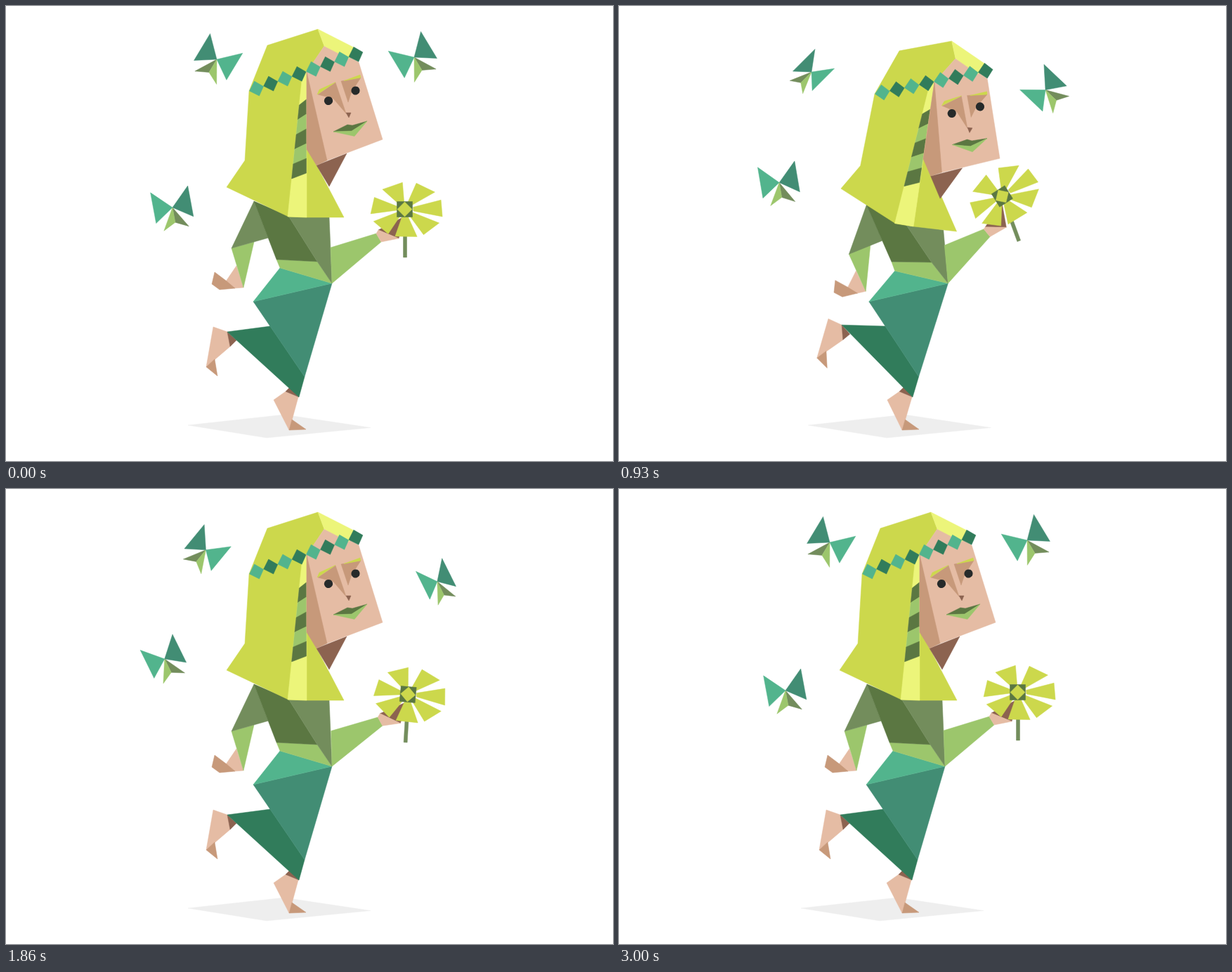
Animation, 864 px wide and 648 px high, one loop 3600 ms. Source, as an HTML page with a canvas:

```html
<!DOCTYPE html>
<html lang="en">
<head>
<meta charset="utf-8">
<title>Runner with flower</title>
<style>
html, body { margin: 0; width: 100%; height: 100%; overflow: hidden; background: #fff; }
canvas { display: block; }
</style>
</head>
<body>
<canvas id="stage" width="864" height="648"></canvas>
<script>
const ctx = document.getElementById('stage').getContext('2d');
const LOOP = 3600, FLIGHT = 3000, STEP = 30;
const { PI, sin, cos, floor } = Math;
const DEG = PI / 180;

const C = {
  hair: '#ccd84c', shine: '#ecf57a', skin: '#e5bca4', tan: '#c7997a', brown: '#8c6350',
  moss: '#5b7742', olive: '#738d5c', leaf: '#9cc66c',
  mint: '#52b48d', teal: '#428d74', pine: '#317c5b', eye: '#262a2a', shadow: '#eeeeee'
};

// ---- timing ----
const cubic = u => u < .5 ? 4 * u ** 3 : 1 - 4 * (1 - u) ** 3;
const smooth = u => u * u * (3 - 2 * u);

// keys: [time, value] pairs with eased travel between them
function eased(t, keys, ease) {
  for (let i = 1; i < keys.length; i++) {
    const [t0, a] = keys[i - 1], [t1, b] = keys[i];
    if (t < t1) return a + (b - a) * ease((t - t0) / (t1 - t0));
  }
  return keys[keys.length - 1][1];
}

// ---- geometry ----
const still = (x, y) => [x, y];

// point map: turns by deg about (px, py), then shifts by (dx, dy)
function turn(px, py, dx, dy, deg) {
  const c = cos(deg * DEG), s = sin(deg * DEG);
  return (x, y) => [
    px + dx + (x - px) * c - (y - py) * s,
    py + dy + (x - px) * s + (y - py) * c
  ];
}

// joint factory: rest place plus k times its reach
const joints = k => (x, y, dx, dy) => [x + k * dx, y + k * dy];

function fill(color, points) {
  ctx.beginPath();
  for (const [x, y] of points) ctx.lineTo(x, y);
  ctx.closePath();
  ctx.fillStyle = ctx.strokeStyle = color;
  ctx.fill();
  ctx.stroke();
}

// flat x, y list drawn through a point map
function shape(color, map, ...xy) {
  const points = [];
  for (let i = 0; i < xy.length; i += 2) points.push(map(xy[i], xy[i + 1]));
  fill(color, points);
}

// ---- figure ----
function legs(p, hip, seat) {
  shape(C.skin, still, 381, 561, 398, 549, 416, 557, 407, 590, 403, 604);
  shape(C.brown, still, 404, 543, 417, 557, 398, 549);
  shape(C.tan, still, 403, 604, 407, 589, 427, 603);

  const foot = turn(315, 464, -p, -9.3 * p, 4.8 * p);
  shape(C.skin, foot, 295, 457, 315, 464, 319, 485, 285, 514);
  shape(C.brown, foot, 315, 464, 328, 476, 319, 485);
  shape(C.tan, foot, 285, 514, 297, 503, 301, 527);

  const knee = foot(315, 464), belly = [352, 421], hem = [425, 528];
  fill(C.pine, [knee, [376, 456], hem, [417, 557]]);
  fill(C.teal, [belly, hip, hem]);
  fill(C.mint, [seat, hip, belly]);
}

function torso(p, hip, seat) {
  const at = joints(p);
  const shoulder = at(353, 278, -7, 5), back = at(385, 361, -2, 3), waist = at(443, 364, -3, 1);
  const chest = at(402, 299, 0, 11), bust = at(460, 300, -4, 18), elbow = at(321, 345, 1, 8);
  const armpit = shoulder.map((v, i) => v + .63 * (back[i] - v));

  const forearm = turn(321, 345, p, 8 * p, -8 * p);
  shape(C.skin, forearm, 328, 370, 338, 401, 325, 402, 313, 392);
  shape(C.tan, forearm, 297, 379, 313, 391, 326, 402, 304, 404, 293, 396);
  shape(C.leaf, forearm, 321, 345, 353, 336, 338, 401);
  fill(C.olive, [shoulder, armpit, elbow]);
  fill(C.leaf, [back, waist, hip, seat]);
  fill(C.moss, [shoulder, chest, waist, back]);
  fill(C.olive, [chest, bust, hip, waist]);
}

function armWithFlower(q, hip) {
  const at = joints(q);
  const wrist = at(527, 324, -13, -6), cuff = at(534, 336, -11, -7);
  const knuckle = at(530, 319, -14, -4), palm = at(559, 331, -13, -15);
  const [x, y] = at(567.5, 289.5, -27.5, -17.5);

  shape(C.olive, turn(0, 0, x, y, -20 * q), -2, 20, 3, 20, 3, 68.5, -2, 68.5);
  fill(C.leaf, [at(462, 344, -4, -3), wrist, cuff, hip]);
  fill(C.brown, [knuckle, [x, y + 10], palm]);
  fill(C.skin, [wrist, knuckle, palm, cuff]);

  const spin = turn(0, 0, x, y, -31 * q);
  // seven petals on a squashed ring, crowded a little to one side
  const ring = (a, r) => spin(.06 * r + r * sin(a), .02 * r - .76 * r * cos(a));
  for (let i = 0; i < 7; i++) {
    const even = i * 2 * PI / 7 - 23 * DEG;
    const a = even + 6.5 * DEG * sin(even + 10 * DEG), w = 17.5 * DEG;
    fill(C.hair, [ring(a - w, 52), ring(a + w, 52), ring(a + w, 12), ring(a - w, 12)]);
  }
  shape(C.moss, spin, -11, -11, 11, -11, 11, 11, -11, 11);
  shape(C.hair, spin, 0, -10.5, 10.5, 0, 0, 10.5, -10.5, 0);
}

function hair(p, head) {
  const at = joints(p);
  const crown = head(444, 33), fringe = head(428, 94), parting = head(428, 301);
  fill(C.hair, [
    head(372, 56), crown, head(453, 57), fringe, parting, head(402, 300),
    at(314, 258, -5, 2), at(340, 220, -4, 7), head(346, 121)
  ]);
  fill(C.hair, [head(428, 200), at(481, 301, -6, 19), parting]);
  shape(C.brown, head, 442, 227, 485, 210, 460, 257);

  const edge = y => 422 - (y - 96) * .103;
  shape(C.shine, head, edge(96), 96, 428, 92, 428, 301, edge(300), 300);
  for (let i = 0; i < 5; i++) {
    const l = 141 + 21 * i, r = l - 8;
    shape(i % 2 ? C.leaf : C.moss, head, edge(l), l, 427.5, r, 427.5, r + 21, edge(l + 21), l + 21);
  }
}

function face(head, tilt, shut) {
  shape(C.skin, head, 453, 57, 488, 72, 502, 80, 536, 190, 457, 220, 428, 204, 428, 94);
  shape(C.tan, head, 428, 94, 457, 220, 442, 227, 428, 204);
  shape(C.shine, head, 444, 33, 497, 60, 488, 75, 453, 57);

  shape(C.tan, head, 444, 126, 469, 109, 484, 153, 466, 132);
  shape(C.tan, head, 477, 107, 505, 102, 492, 122, 487, 137);
  shape(C.hair, head, 443, 126, 446, 119, 469, 108.5);
  shape(C.hair, head, 481, 106.5, 504, 98, 505, 102);
  shape(C.brown, head, 484, 152, 491, 152, 488, 159);
  shape(C.moss, head, 466, 179, 486, 169, 493, 170, 514, 164, 492, 178);
  shape(C.leaf, head, 466, 179, 492, 178, 514, 164, 496, 185.5);

  ctx.fillStyle = C.eye;
  for (const [x, y] of [head(459, 135), head(497.5, 120.5)]) {
    ctx.save();
    ctx.translate(x, y);
    ctx.rotate((tilt - 17) * DEG);
    ctx.beginPath();
    if (shut) ctx.rect(-8, 2.8, 16, 4.4);
    else ctx.arc(0, 0, 6.1, 0, 2 * PI);
    ctx.fill();
    ctx.restore();
  }

  for (let i = 0; i < 8; i++) {
    const x = 356.5 + 20.2 * i, y = 117.5 - 6.95 * i;
    shape(i % 2 ? C.pine : C.mint, head, x - 3, y - 10.5, x + 10, y - 3, x + 4, y + 10.5, x - 10, y + 3.5);
  }
}

// ---- butterflies ----
// side 1 has the dark wing on the right; beats is the number of flaps per flight
function butterfly(side, x, y, tilt, t, beats) {
  const open = .85 + .15 * cos(2 * PI * beats * t / FLIGHT);
  const map = turn(0, 0, x, y, tilt);
  for (const [dir, upper, lower] of [[side, C.teal, C.olive], [-side, C.mint, C.leaf]]) {
    const w = dir * open;
    shape(lower, map, 0, 0, 18 * w, 30.5, 0, 21.5);
    shape(upper, map, 0, 0, 27 * w, -26.5, 27 * w, 18);
  }
}

function butterflies(t) {
  const phase = PI * t / FLIGHT;
  const drift = sin(phase) ** 2, swing = sin(2 * phase);
  const dash = eased(t, [[0, 0], [860, 1], [1100, 1], [2850, 0]], smooth);
  butterfly(-1, 300 - 26 * dash, 76 + 18 * dash, 31 + 14 * dash, t, 11);
  butterfly(1, 581 + 38 * drift, 73 + 68 * drift, -31 - 13 * swing - 5 * drift, t, 7);
  butterfly(1, 237 - 13 * drift, 287 - 52 * drift, -10.5 + 9 * swing - 11 * drift, t, 3);
}

function draw(t) {
  const bow = eased(t, [[0, 0], [820, 1.06], [870, 1.06], [1700, 0]], cubic);
  const reach = eased(t, [[0, 0], [820, 1.06], [870, 1.06], [1700, -.18], [2400, 0]], cubic);
  const sway = eased(t, [[0, 0], [360, -3.6], [930, 4.4], [1680, 0]], smooth);
  const shut = t >= 570 && t < 750;

  ctx.fillStyle = '#fff';
  ctx.fillRect(0, 0, 864, 648);
  ctx.lineWidth = .5;
  ctx.lineJoin = 'round';

  const ground = turn(0, 0, 1.7 * sway + 2.7 * bow, 0, 0);
  shape(C.shadow, ground, 259, 597, 396, 582, 519, 600.5, 371, 615);

  const hip = [464, 395], seat = joints(bow)(390, 373, -2, 4);
  const tilt = 6.7 * bow;
  const head = turn(444, 33, 17 * bow, 16 * bow, tilt);

  // the whole figure leans about the planted toe
  ctx.save();
  ctx.transform(1, 0, -sway / 210, 1, sway * 604 / 210, 0);
  legs(bow, hip, seat);
  torso(bow, hip, seat);
  armWithFlower(reach, hip);
  hair(bow, head);
  face(head, tilt, shut);
  ctx.restore();

  butterflies(Math.min(t, FLIGHT));
}

const start = performance.now();
function tick() {
  const t = (performance.now() - start) % LOOP;
  draw(floor(t / STEP) * STEP);
  requestAnimationFrame(tick);
}
draw(0);
requestAnimationFrame(tick);
</script>
</body>
</html>
```
